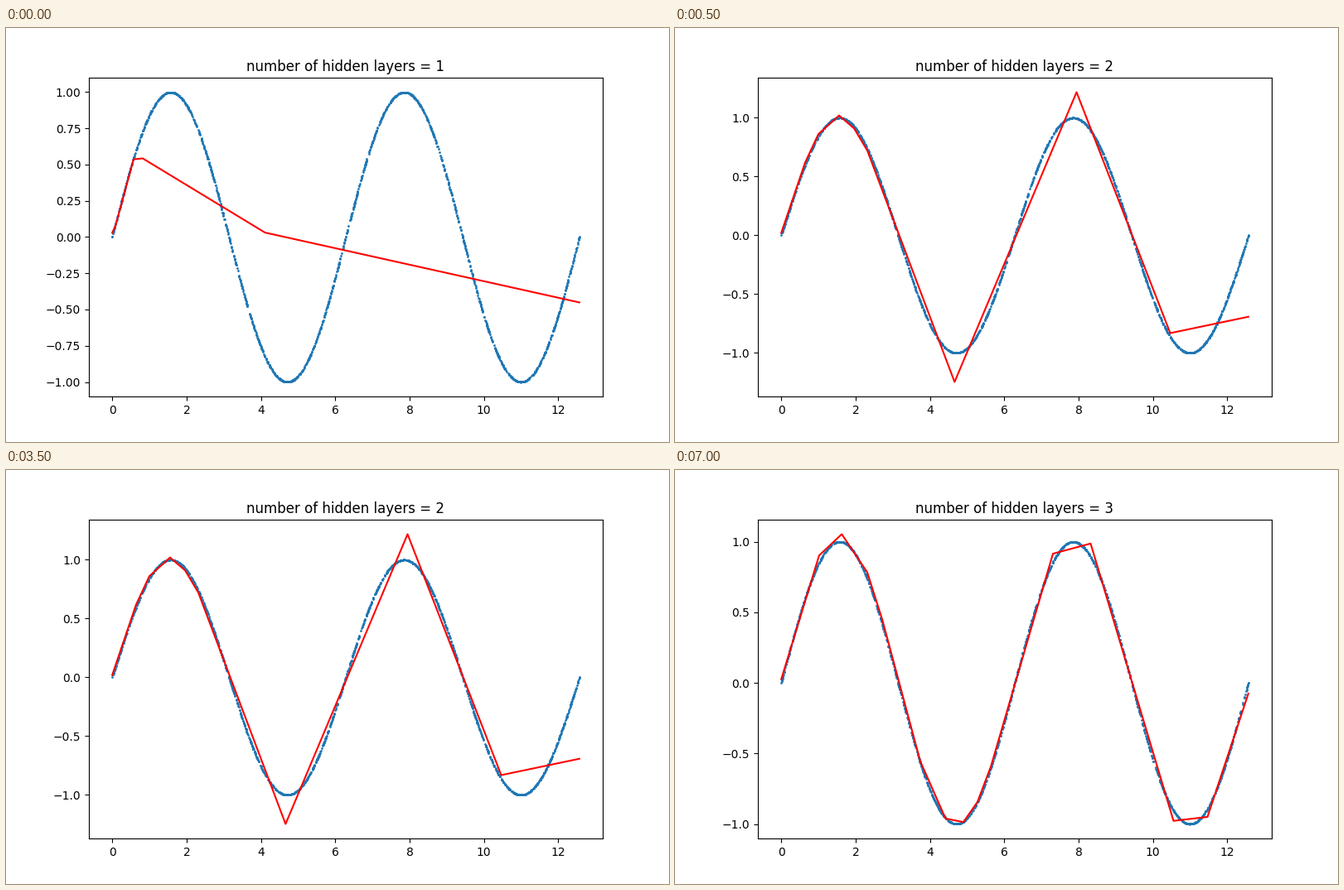
These frames come from a looping animation (800 px wide and 500 px high, 8000 ms). A matplotlib script:

```python
import numpy as np
import matplotlib.pyplot as plt
from matplotlib.animation import FuncAnimation

END = 4 * np.pi
STEP = 500  # ms per frame


def samples(seed, count=1600):
    rng = np.random.default_rng(seed)
    x = rng.uniform(0, END, count)
    x[:2] = 0, END
    return x, np.sin(x)


def fit(bends, gain, bias, corners):
    """Follow a scaled sine through the bends, then run along free corners."""
    wave = [(x, gain * np.sin(x) + bias) for x in bends]
    return np.array(wave + corners).T


FITS = {
    1: fit([0], 1, .03,
           [(.09, .08), (.575, .537), (.82, .543), (4.11, .031),
            (END, -.451)]),
    2: fit([0, .64, 1, 1.556], 1, .02,
           [(1.96, .91), (2.315, .722), (4.663, -1.2465), (7.945, 1.218),
            (10.465, -.831), (END, -.692)]),
    3: fit([0, 1.02, 1.628, 2.315, 2.72, 3.74, 4.42, 4.9, 5.28, 5.64],
           1.03, .025,
           [(7.31, .915), (8.323, .987), (10.553, -.978), (11.467, -.95),
            (END, -.076)]),
}


def layers_at(ms):
    if ms < 500:
        return 1
    return 2 if ms < 5500 else 3


fig, ax = plt.subplots(figsize=(8, 5), dpi=100)


def draw(i):
    n = layers_at(i * STEP)
    ax.clear()
    ax.scatter(*samples(n), s=1)
    ax.plot(*FITS[n], color="red")
    ax.set_title(f"number of hidden layers = {n}")
    return ax.get_children()


anim = FuncAnimation(fig, draw, frames=16, interval=STEP,
                     init_func=lambda: draw(0), repeat=True, repeat_delay=0)
plt.show()
```
